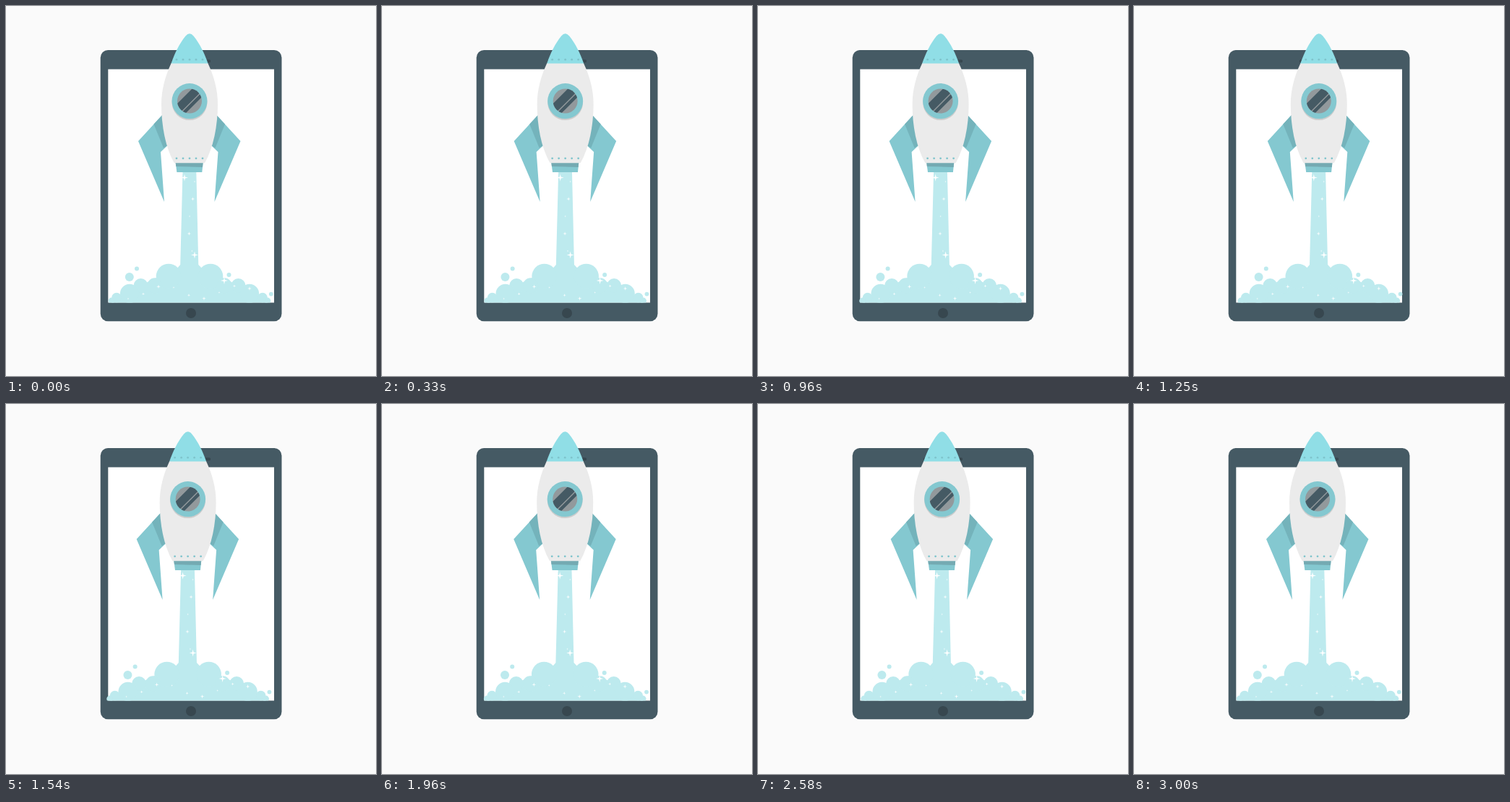
These frames come from a looping animation (512 by 512 pixels, 3.04 s). An HTML page:

```html
<!DOCTYPE html>
<html lang="en">
<head>
<meta charset="utf-8">
<title>Rocket launch</title>
<style>
html, body { margin: 0; width: 100%; height: 100%; overflow: hidden; background: #fafafa; }
svg { display: block; width: 100vw; height: 100vh; }
</style>
</head>
<body>
<svg viewBox="0 0 512 512">
  <defs>
    <clipPath id="floor"><path d="M0 0H512V410.6H0z"/></clipPath>
    <clipPath id="glass"><circle cx="254" cy="131.5" r="17"/></clipPath>
    <g id="wing">
      <path fill="#84c8d0" d="M217 150L183 187L219 271L214 202L224 192.5z"/>
      <path fill="#74b3bb" d="M217 150L204.5 163.5L218 196.5L224 192.5z"/>
    </g>
  </defs>

  <rect x="130.7" y="61" width="250.8" height="375.3" rx="10.5" fill="#455a64"/>
  <path fill="#fff" d="M141.3 87.5H371V410.6H141.3z"/>
  <circle cx="256" cy="425" r="7" fill="#37474f"/>
  <rect x="229" y="74.3" width="54" height="4" rx="1.5" fill="#37474f"/>

  <g clip-path="url(#floor)">
    <g id="ship">
      <g id="smoke" fill="#bdeaee">
        <path d="M244.5 229H263.3L266.3 358L272 364V372H236V364L241.2 358z"/>
        <path d="M146 411V406L171 394L225 368H283L337 394L362 406V411z"/>
      </g>
      <g id="stars" fill="#fff"></g>
      <use href="#wing"/>
      <use href="#wing" transform="matrix(-1 0 0 1 507.5 0)"/>
      <path fill="#84c8d0" d="M234.7 217H272.6L271.3 230H236.4z"/>
      <path fill="#74aab2" d="M234.7 217H272.6L272 223L235.3 222z"/>
      <path fill="#ebebeb" d="M228.7 79C220 98 215 116 215 136C215 166 220.7 196 232.8 217.3H275C287 196 293 166 293 136C293 116 288 98 279.3 79z"/>
      <path fill="#90dee6" d="M228.5 79.6C233 66 240 52 248.5 41.5Q254 35 259.5 41.5C268 52 275 66 279.5 79.6z"/>
      <g id="rivets" fill="#7fc4cc"></g>
      <circle cx="254" cy="133.7" r="24.4" fill="#cdcdcd"/>
      <circle cx="254" cy="131.6" r="24.5" fill="#84c8d0"/>
      <g clip-path="url(#glass)">
        <path fill="#92999c" d="M236 113H272V150H236z"/>
        <path fill="#455a64" d="M232 140L262 110H278.5L238.5 150zM240.5 150L280.5 110H287L247 150z"/>
      </g>
    </g>
  </g>
</svg>
<script>
const byId = id => document.getElementById(id);
const fill = (id, parts) => byId(id).innerHTML += parts.join("");
const range = n => [...Array(n).keys()];
const circle = (x, y, r) => `<circle cx="${x}" cy="${y}" r="${r}"/>`;

// Four-pointed star
const star = (x, y, r) => {
  const k = r * 0.18, d = r - k;
  return `<path d="M${x} ${y - r}l${k} ${d}l${d} ${k}l${-d} ${k}l${-k} ${d}l${-k} ${-d}l${-d} ${-k}l${d} ${-k}z"/>`;
};

const axis = 254;

// Each puff sits on both sides of the axis: distance, y, radius
const puffs = [[29, 374, 17.3], [48, 387, 10.7], [67.5, 387, 10], [83, 398, 13.2], [101, 403.6, 6.8], [108, 408, 4.4]];
const bubbles = [[170.8, 375, 6], [181, 363.5, 3], [308.5, 372, 3], [366.8, 398.6, 2.9]];
fill("smoke", puffs.map(([d, y, r]) => circle(axis - d, y, r) + circle(axis + d, y, r)));
fill("smoke", bubbles.map(b => circle(...b)));

// Three bright stars, then small ones along the smoke and the jet
const bright = [[247, 237.5], [261, 344.5], [302, 380]];
fill("stars", bright.map(p => star(...p, 5)));
fill("stars", range(9).map(i => star(169 + 21 * i, 396 + 9 * Math.cos(i * 1.3), 1.5 + i % 3 * 0.7)));
fill("stars", range(5).map(i => star(257 + 4 * Math.cos(i * 1.2), 243 + 24 * i, 1.4 + i % 2 * 1.4)));

fill("rivets", range(5).map(i => circle(236 + 9 * i, 74.2, 1.4) + circle(236 + 9 * i, 210.8, 1.4)));

// Sideways shake that swells and fades over the loop
const loop = 3040, step = loop / 73;
function shake(t) {
  const swell = Math.sin(Math.PI * t / loop) ** 2;
  return 4 * swell * Math.sin(0.0101 * t + 0.95 * swell - 4.58);
}

function draw() {
  const t = Math.floor(performance.now() % loop / step) * step;
  byId("ship").setAttribute("transform", `translate(${shake(t).toFixed(2)} 0)`);
  requestAnimationFrame(draw);
}
draw();
</script>
</body>
</html>
```
